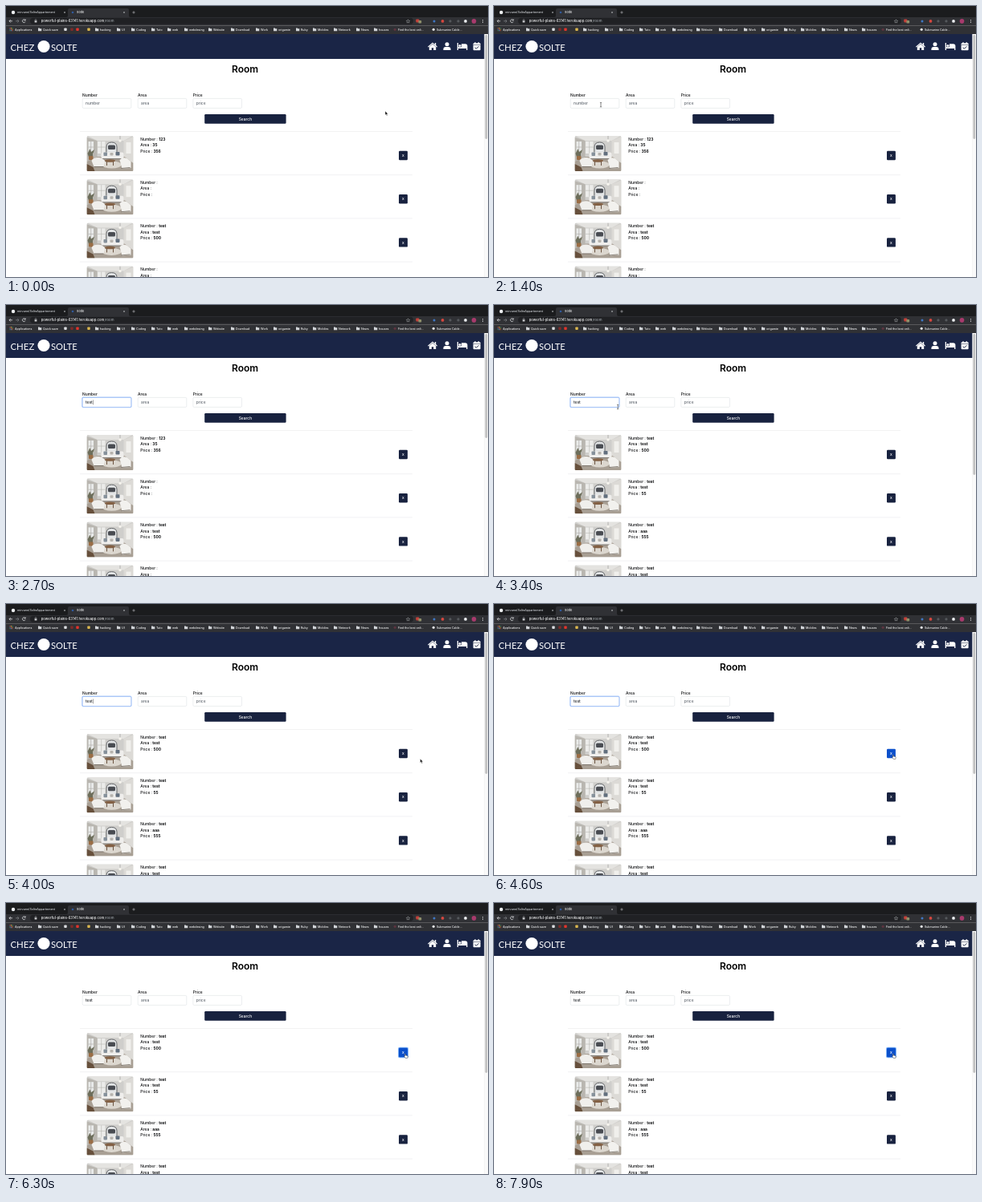
Recreate the animation shown at these times as an HTML page. Size 600 by 338 pixels, loop 8000 ms.

```html
<!DOCTYPE html>
<html lang="en">
<head>
<meta charset="utf-8">
<title>Room search</title>
<style>
  html, body { margin: 0; width: 100%; height: 100%; overflow: hidden; background: #fff; }
  svg { display: block; width: 100vw; height: 100vh; font-weight: 500; }
  text { font-family: Inter, "Open Sans", sans-serif; white-space: pre; }
  .logo { font-family: Lato, sans-serif; font-weight: 400; }
</style>
</head>
<body>
<svg id="stage" viewBox="0 0 600 338" preserveAspectRatio="none"></svg>
<script>
const LOOP = 8000, STEP = 100;
const NAVY = '#18223f', BAR = '#303135', PITCH = 54.2;
const stage = document.getElementById('stage');

const rect = (x, y, w, h, fill, r = 0, more = '') =>
  `<rect x="${x}" y="${y}" width="${w}" height="${h}" rx="${r}" fill="${fill}" ${more}/>`;
const dot = (x, y, r, fill) => `<circle cx="${x}" cy="${y}" r="${r}" fill="${fill}"/>`;
const line = (d, color, w, more = '') =>
  `<path d="${d}" fill="none" stroke="${color}" stroke-width="${w}" ${more}/>`;
const shape = (d, fill, more = '') => `<path d="${d}" fill="${fill}" ${more}/>`;
const text = (x, y, s, size = 4.9, fill = '#0c0d0f', more = '') =>
  `<text x="${x}" y="${y}" font-size="${size}" fill="${fill}" ${more}>${s}</text>`;

function tabs() {
  const cross = x => line(`M${x - 1} 7l2 2m0 -2l-2 2`, '#d5d6d8', .45);
  return rect(0, 0, 600, 14, '#1b1c1e') +
    shape('M75 14q2 0 2-2V5q0-2 2-2h72q2 0 2 2v7q0 2 2 2z', BAR) +
    dot(9, 8, 2.2, '#eceef0') +
    text(14, 9.3, 'mirvane/SolteAppartement', 3.65, '#c9ccd0') + cross(73) +
    dot(83, 8, 1.3, '#315a9d') +
    text(88, 9.3, 'Solte', 3.8, '#f1f2f3') + cross(147) +
    line('M157.3 8h3.4m-1.7 -1.7v3.4', '#d5d6d8', .5);
}

function toolbar() {
  const icons = [[533, 1.5, '#3f78c4'], [543.5, 1.9, '#d5473f'], [553, 1.6, '#55585c'],
    [563, 1.6, '#55585c'], [572, 1.9, '#eceef0'], [582.5, 2.8, '#a83a6c']];
  return rect(0, 14, 600, 10.5, BAR) +
    rect(30, 14.8, 477, 8, '#202124', 4) +
    line('M8 18.8H4m1.8 -1.8l-1.8 1.8 1.8 1.8', '#eceef0', .7) +
    line('M12 18.8h4m-1.8 -1.8l1.8 1.8 -1.8 1.8', '#85888c', .7) +
    line('M24 17.8a1.9 1.9 0 1 0 .1 1.7M24.2 16.4v1.6h-1.6', '#eceef0', .7) +
    rect(35.6, 18.2, 2.8, 2.3, '#cfd1d4', .3) +
    line('M36.1 18.3v-.8a.9 .9 0 0 1 1.8 0v.8', '#cfd1d4', .45) +
    text(43.7, 20.3, 'powerful-plains-63141.herokuapp.com<tspan fill="#9aa0a6">/room</tspan>', 4.25, '#f1f2f3') +
    line('M500.5 16.8l.7 1.4 1.5 .2-1.1 1.1.3 1.5-1.4-.7-1.4 .7.3-1.5-1.1-1.1 1.5-.2z', '#d4d6d9', .4) +
    rect(510.3, 16.4, 4, 4, '#c3413a', .8) + rect(513.4, 18, 3.8, 3.6, '#8d8f6a', .8) +
    icons.map(([x, r, c]) => dot(x, 18.9, r, c)).join('') +
    [-1.5, 0, 1.5].map(d => dot(593.5, 18.9 + d, .5, '#eceef0')).join('');
}

function bookmarks() {
  const folders = [['Quick save', 46], ['hacking', 117], ['UI', 144], ['Coding', 162], ['Tuto', 187],
    ['web', 207], ['webdesing', 228], ['Website', 258], ['Download', 286], ['Work', 317],
    ['origamie', 339], ['Ruby', 367], ['Mobiles', 388], ['Network', 414], ['News', 442], ['houses', 464]];
  const links = [['Find the best onli...', 488, '#5d3440'], ['Submarine Cable...', 536, '#e4e6e8']];
  const small = [[74, '#d9dbde'], [82, '#7d2b29'], [89, '#e0342c'], [103, '#d9b64e']];
  const grid = ['#e25b4c', '#e6b23c', '#4aa564', '#4f84d8'];
  let out = rect(0, 24.4, 600, 10.6, BAR);
  for (let i = 0; i < 9; i++)
    out += rect(4.5 + i % 3 * 1.5, 27.2 + Math.floor(i / 3) * 1.5, 1, 1, grid[i % 4]);
  out += text(11, 30.6, 'Applications', 3.6, '#f1f2f3');
  for (const [name, x] of folders)
    out += shape(`M${x - 6} 27.6h1.7l.6 .6h2v3h-4.3z`, '#d3d6da') + text(x, 30.6, name, 3.6, '#f1f2f3');
  for (const [name, x, c] of links)
    out += dot(x - 3.8, 29.3, 1.6, c) + text(x, 30.6, name, 3.5, '#f1f2f3');
  return out + small.map(([x, c]) => rect(x - 1.7, 27.6, 3.4, 3.4, c, .7)).join('');
}

function header() {
  const home = shape('M525 50.7l6 -5.2 2.8 2.4v-1.8h1.4v3l1.8 1.6-.8 .9-5.2-4.5-5.2 4.5z' +
    'M526.8 51l4.2-3.6 4.2 3.6v4.1h-3v-2.8h-2.4v2.8h-3z', '#fff');
  const user = dot(549, 47.8, 2.5, '#fff') +
    shape('M544.4 55.1v-1.2q0-2.9 2.9-2.9h3.4q2.9 0 2.9 2.9v1.2z', '#fff');
  const bed = shape('M561.7 46h1.3v5.3h4V47.3h4.7q2.7 0 2.7 2.7v4.9h-1.3v-1.8H563v1.8h-1.3z', '#fff') +
    dot(565, 49.4, 1.5, '#fff');
  const calendar = rect(581.6, 46.3, 9, 9, '#fff', 1) +
    line('M584 45v2m4.2 -2v2', '#fff', 1.1) +
    line('M581.6 48.5h9', NAVY, .5) + line('M583.8 51.7l1.6 1.6 3 -3', NAVY, 1);
  return rect(0, 35, 595.3, 31, '#1a2546') +
    text(5.5, 56, 'CHEZ', 11.4, '#fff', 'class="logo"') +
    dot(47, 50.5, 7.6, '#fff') +
    text(56, 56, 'SOLTE', 11.2, '#fff', 'class="logo"') +
    home + user + bed + calendar;
}

// Soft stand-in for a bright living room, 58 by 44.
const photo = `<symbol id="photo" viewBox="0 0 58 44"><g>
  ${rect(0, 0, 58, 44, '#cfcecb', 1.5)}
  ${shape('M1 0H57L46 6H13z', '#e4e3e0')}
  ${shape('M0 2L13 6V26L0 32z', '#b9b6b0')}
  ${rect(2, 7, 6.5, 16, '#e9ebea')}${line('M5.2 7v16M2 14h6.5', '#9c9a95', .5)}
  ${rect(13.5, 7, 9.5, 15, '#ececea')}${line('M18.2 7v15M13.5 14h9.5', '#a9a8a5', .5)}
  ${shape('M46 6L58 1V35L46 28z', '#dcdad6')}
  ${rect(49, 8, 6, 14, '#f0efec')}
  ${shape('M0 32L13 26H47L58 34V42.5Q58 44 56.5 44H1.5Q0 44 0 42.5z', '#a89f94')}
  ${shape('M24.5 23V14q0-6 6.5-6t6.5 6v9z', '#e3e5e6', 'stroke="#55575b" stroke-width=".9"')}
  ${rect(26.5, 11.5, 9, 5.5, '#494c52', 1.5)}
  ${line('M41.5 0v5', '#666', .4)}${dot(41.5, 6, 1.7, '#f6f4ee')}
  ${rect(18, 20.5, 28, 8, '#efeeec', 2)}${line('M19 28.6h26', '#67625d', .8)}
  ${rect(21, 20.5, 4.5, 4.5, '#86919b', .8)}${rect(36, 20, 5, 4.5, '#626f7e', .8)}
  ${rect(29, 21, 4, 3.5, '#b6b3ae', .8)}
  ${shape('M1 22l3-6 1.5 4 4-3-2 6.5v4H3z', '#6d6e5b')}${rect(2.5, 25, 5.5, 5, '#9a6d45', 1)}
  <ellipse cx="31" cy="36" rx="12" ry="4.5" fill="#dcd7cf"/>
  ${shape('M6 31q2-4 8-4t9 5l-2 6.5H9z', '#f0efec')}${line('M9 38.5h12', '#6b6259', .8)}
  <ellipse cx="29" cy="31" rx="6.5" ry="1.8" fill="#836044"/>
  ${line('M25 32v5m8 -5v5', '#5d4531', .9)}
  ${shape('M41 30q3-4 9-2l5 4v8l-11 1z', '#f2f1ee')}${line('M43 40.5l11 -1', '#6b6259', .8)}
  ${shape('M0 35l8 4 2 5H1.5Q0 44 0 42.5z', '#67503c')}
</g></symbol>`;

function form() {
  const fields = [['Number', 95], ['Area', 164], ['Price', 232.7]];
  return text(297.5, 83.4, 'Room', 12, '#000', 'text-anchor="middle" font-weight="600"') +
    rect(94.3, 114.6, 62.2, 13.6, '#b4cffa', 1.8, 'id="ring"') +
    fields.map(([name, x], i) => text(x, 113.4, name) +
      rect(x + .2, 115.4, 60.6, 12, '#fff', 1.3, `id="box${i}" stroke="#ced4da" stroke-width=".4"`) +
      text(x + 4, 123.2, name.toLowerCase(), 4.9, '#646b73', `id="hint${i}"`)).join('') +
    text(99, 123.2, '', 4.9, '#22262b', 'id="typed"') +
    rect(108.8, 118.4, .4, 6, '#222', 0, 'id="caret"') +
    rect(247.2, 135.1, 101.4, 11.6, NAVY, 1.2) +
    text(297.9, 142.7, 'Search', 4.9, '#fff', 'text-anchor="middle"');
}

function row(i) {
  const y = 162 + i * PITCH;
  return line(`M92 ${y - 5.5}H506`, '#dedfe1', .4) +
    `<use href="#photo" x="100.5" y="${y}" width="58" height="44"/>` +
    ['Number', 'Area', 'Price'].map((name, k) =>
      text(167.3, y + 5.6 + k * 7.5, `${name} : <tspan id="v${i}${k}" font-weight="700"></tspan>`)).join('') +
    rect(488, y + 17.8, 13, 13.4, '#80b3f7', 2, `id="halo${i}" visibility="hidden"`) +
    rect(489, y + 18.8, 10.9, 11.4, NAVY, 1.2, `id="del${i}"`) +
    text(494.4, y + 26.2, 'x', 4.9, '#fff', 'text-anchor="middle"');
}

function menu() {
  const items = ['azerty', 'aze', 'dsqd', 'dqsdqs', 'dsqdsq', 'fdsfd'];
  const item = (s, i) => text(98.8, 137.4 + i * 11.3, s, 3.9, '#f1f1f1');
  return `<g id="menuAll">${rect(95, 128, 60.7, 72.6, '#222326', .8)}${items.map(item).join('')}</g>
    <g id="menuOne">${rect(95, 128, 60.7, 17, '#222326', .8)}${item('test', 0)}</g>`;
}

function pointer() {
  const edge = 'stroke="#fff" stroke-width=".45" stroke-linejoin="round"';
  return `<g id="pointer">
    <g id="arrow">${shape('M0 0V5l1.2-1 .8 1.9 .9-.4-.8-1.8h1.6z', '#111', edge)}</g>
    <g id="beam">${line('M-1.1 -2.6q1.1 0 1.1 .7v4.2q0 .7 -1.1 .7m2.2 -5.6q-1.1 0 -1.1 .7m0 4.2q0 .7 1.1 .7', '#222', .55)}</g>
    <g id="hand">${shape('M-.6 3V.3q.5-.7 1 0V2l2.3 .5q.6 .2 .5 .9L2.8 5.4H.3L-1.4 3.2q0-.8 .8-.2z',
      '#fff', 'stroke="#111" stroke-width=".4" stroke-linejoin="round"')}</g>
  </g>`;
}

stage.innerHTML = `<defs>${photo}</defs>` + rect(0, 0, 600, 338, '#fff') +
  form() + [0, 1, 2, 3].map(row).join('') + menu() +
  rect(595.3, 35, 4.7, 303, '#fafafa') + line('M595.4 35V338', '#e6e6e6', .3) +
  rect(596.4, 36, 2.8, 130, '#c1c1c1', 1.4, 'id="thumb"') +
  tabs() + toolbar() + bookmarks() + header() + pointer();

const el = {};
stage.querySelectorAll('[id]').forEach(node => el[node.id] = node);
const show = (id, on) => el[id].setAttribute('visibility', on ? 'visible' : 'hidden');
const set = (id, name, value) => el[id].setAttribute(name, value);

const before = [['123', '35', '356'], ['', '', ''], ['test', 'test', '500'], ['', '', '']];
const after = [['test', 'test', '500'], ['test', 'test', '55'], ['test', 'aaa', '555'], ['test', 'test', '55']];
const path = [[0, 472, 131], [600, 472, 131], [1400, 133, 123], [3300, 133, 123],
  [4000, 515.5, 193], [4150, 515.5, 193], [4500, 497, 188], [LOOP, 497, 188]];
const keys = [2300, 2400, 2500, 2700];

function pointerAt(t) {
  const i = path.findIndex(p => p[0] > t);
  const [t0, x0, y0] = path[i - 1], [t1, x1, y1] = path[i];
  const u = (t - t0) / (t1 - t0), e = u * u * (3 - 2 * u);
  return [x0 + (x1 - x0) * e, y0 + (y1 - y0) * e];
}

function draw(t) {
  const focus = t >= 1600 && t < 5700;
  const typed = 'test'.slice(0, keys.filter(k => t >= k).length);
  show('ring', focus);
  set('box0', 'stroke', focus ? '#5a8ff0' : '#ced4da');
  show('hint0', !typed);
  el.typed.textContent = typed;

  const blinkStart = t < 2300 ? 1600 : t < 2700 ? t : 2700;
  show('caret', focus && (t - blinkStart) % 1000 < 500);
  set('caret', 'x', 99 + (typed ? el.typed.getComputedTextLength() + .2 : -.3));
  show('menuAll', t >= 1800 && t < 2300);
  show('menuOne', t >= 2300 && t < 2700);

  const found = t >= 3000;
  (found ? after : before).forEach((vals, i) =>
    vals.forEach((v, k) => el[`v${i}${k}`].textContent = v));
  set('thumb', 'height', found ? 176 : 130);

  const [x, y] = pointerAt(t);
  const onField = y > 115.4 && y < 127.4 && [95, 164, 232.7].some(left => x > left && x < left + 61);
  const onDelete = x > 489 && x < 500 && y > 181 && y < 192.6;
  set('pointer', 'transform', `translate(${x} ${y})`);
  const moving = t < 2300 || t >= 3400;
  show('arrow', moving && !onField && !onDelete);
  show('beam', moving && onField);
  show('hand', moving && onDelete);
  set('del0', 'fill', onDelete ? '#0b50cb' : NAVY);
  show('halo0', t >= 5700);
}

const start = performance.now();
function tick() {
  const t = (performance.now() - start) % LOOP;
  draw(Math.floor(t / STEP) * STEP);
  requestAnimationFrame(tick);
}
tick();
</script>
</body>
</html>
```
